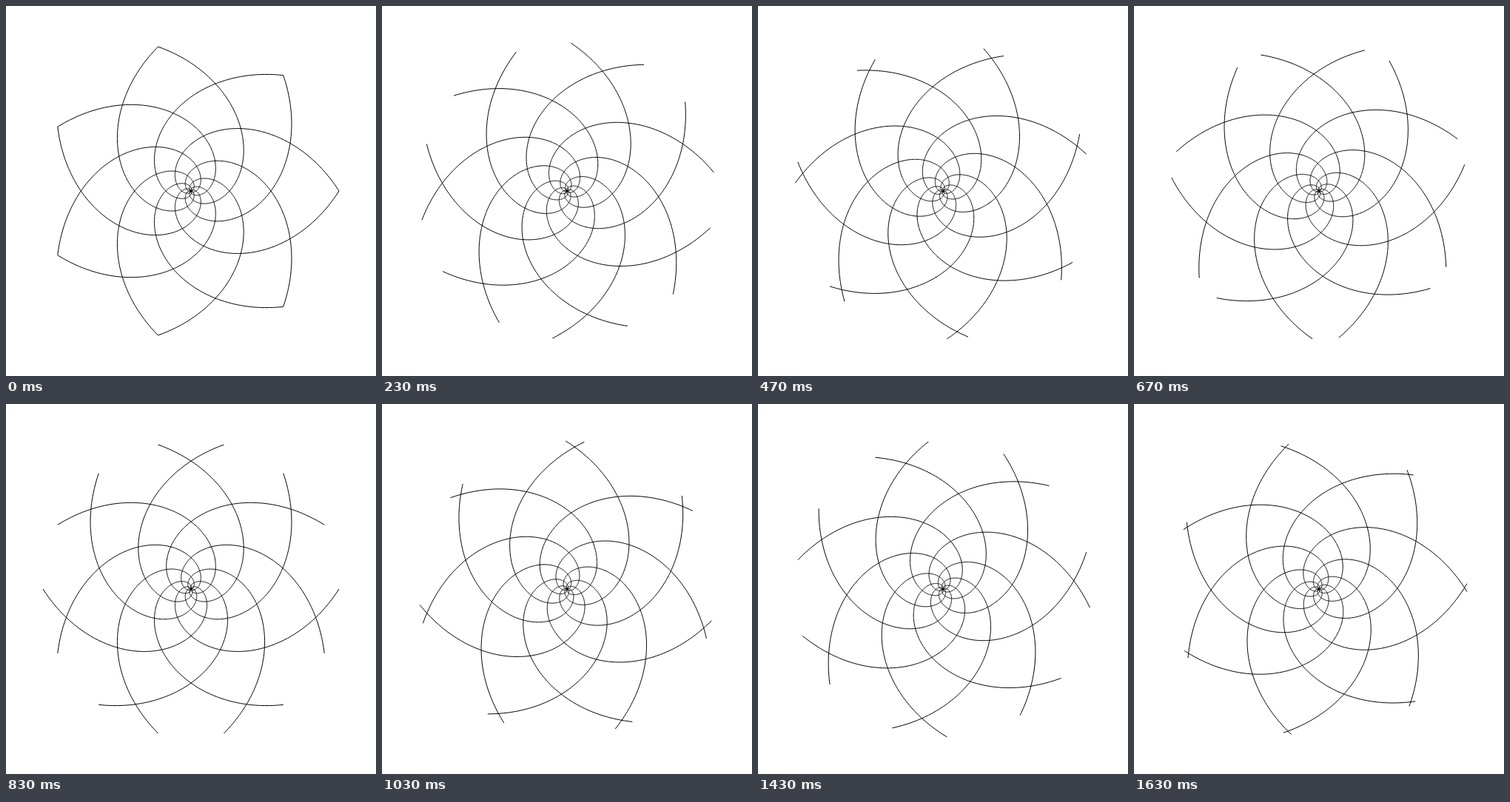
An HTML page with a canvas for the animation above (1660 ms loop, 500x500 px).

```html
<!DOCTYPE html>
<html lang="en">
<head>
<meta charset="utf-8">
<title>Counter-rotating spirals</title>
<style>
  html, body { margin: 0; width: 100%; height: 100%; overflow: hidden; background: #fff; }
  canvas { display: block; width: 500px; height: 500px; }
</style>
</head>
<body>
<canvas id="stage"></canvas>
<script>
const SIZE = 500, RADIUS = 200, ARMS = 7, STEPS = 50, LOOP = 1660, POINTS = 400;
const TURN = 2 * Math.PI, SECTOR = TURN / ARMS;

const canvas = document.getElementById('stage');
const ctx = canvas.getContext('2d');
const scale = window.devicePixelRatio || 1;
canvas.width = canvas.height = SIZE * scale;

// One full turn from the tip to the centre, with a quartic fall in radius.
function addSpiral(tipAngle, direction) {
  for (let i = 0; i <= POINTS; i++) {
    const t = i / POINTS;
    const r = RADIUS * (1 - t) ** 4;
    const angle = tipAngle + direction * TURN * t;
    const x = r * Math.cos(angle), y = r * Math.sin(angle);
    if (i) ctx.lineTo(x, y); else ctx.moveTo(x, y);
  }
}

function draw(progress) {
  ctx.setTransform(scale, 0, 0, scale, 0, 0);
  ctx.fillStyle = '#fff';
  ctx.fillRect(0, 0, SIZE, SIZE);
  ctx.translate(SIZE / 2, SIZE / 2);
  ctx.strokeStyle = '#000';
  ctx.lineWidth = 1;
  for (let arm = 0; arm < ARMS; arm++) {
    for (const [direction, sectors] of [[1, 2], [-1, -1]]) {
      ctx.beginPath();
      addSpiral((arm + sectors * progress) * SECTOR, direction);
      ctx.stroke();
    }
  }
}

// Thirty steps per second, aligned to 10 ms ticks.
function render() {
  const tick = Math.floor((performance.now() % LOOP) / 10);
  draw(Math.floor((tick + 0.5) * 0.3) / STEPS);
  requestAnimationFrame(render);
}
render();
</script>
</body>
</html>
```
